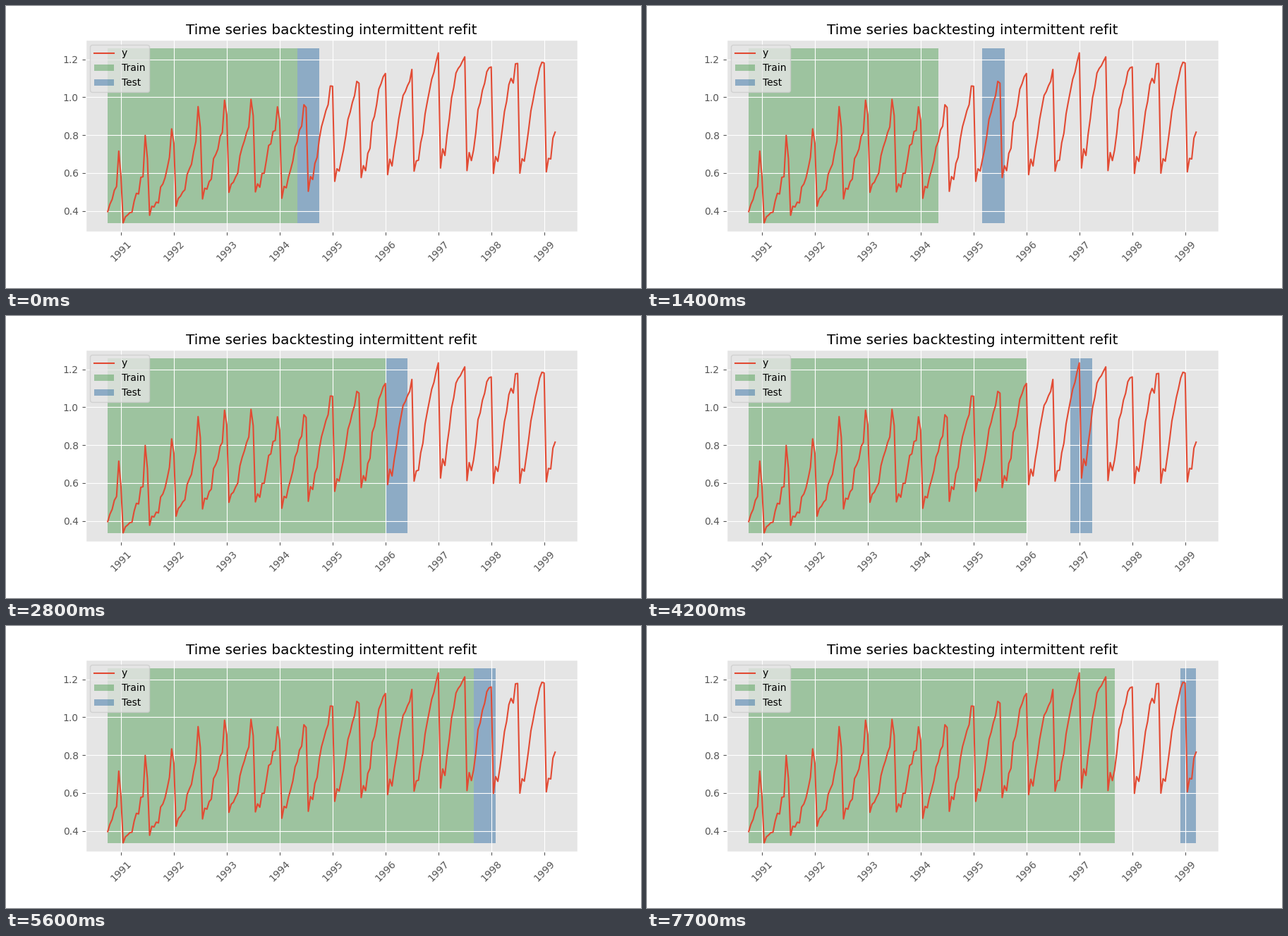
These frames come from a looping animation (900x400 px, 8.4 s). A matplotlib script:

```python
import numpy as np
import matplotlib.pyplot as plt
from matplotlib.animation import FuncAnimation
from matplotlib.patches import Rectangle

plt.rcParams.update({
    "font.family": "DejaVu Sans", "font.size": 10,
    "axes.facecolor": "#E5E5E5", "axes.edgecolor": "white",
    "axes.linewidth": 1, "axes.axisbelow": "line", "axes.grid": True,
    "axes.titlesize": "x-large", "grid.color": "white",
    "xtick.color": "#555555", "ytick.color": "#555555",
})

FIRST_TRAIN, STEP, REFIT, FOLDS = 86, 10, 4, 12
MONTHS, LOW, HIGH = 204, .33622, 1.257
LAST = MONTHS - 1

# Typical January to December values at the start and end of the growth.
EARLY = np.array([.69, .39, .435, .43, .44, .43, .50, .54, .55, .61, .65, .85])
LATE = np.array([1.19, .615, .695, .675, .775, .845,
                 .95, 1.01, 1.085, 1.13, 1.155, 1.18])


def monthly_series():
    """Growing seasonal shape times a slow cycle, with a little noise."""
    t = np.arange(MONTHS)
    season, month = np.divmod(t + 6, 12)
    growth = np.clip((season - 1) / 12, 0, 1)
    shape = EARLY[month] + growth * (LATE - EARLY)[month]
    cycle = np.interp(t / 12, [0, 1, 4, 5, 7, 8, 12, 13, 14, 17],
                      [.8, .9, 1.07, 1.05, .93, 1.02, 1, 1.05, .96, .99])
    noise = np.random.default_rng(4).normal(1, .015, MONTHS)
    return t, np.clip(shape * cycle * noise, LOW, HIGH)


fig, ax = plt.subplots(figsize=(9, 4), dpi=100)
fig.subplots_adjust(left=.125, right=.9, bottom=.2, top=.88)


def add_span(color, label):
    span = Rectangle((0, LOW), 0, HIGH - LOW, facecolor=color, alpha=.4,
                     linewidth=0, label=label)
    return ax.add_patch(span)


line, = ax.plot(*monthly_series(), color="#E24A33", lw=1.5, label="y")
train = add_span("#339138", "Train")
test = add_span("#095595", "Test")

margin = .05 * (HIGH - LOW)
ax.set_xlim(-.05 * LAST, 1.05 * LAST)
ax.set_ylim(LOW - margin, HIGH + margin)
ax.set_xticks(6 + 24 * np.arange(9), range(1991, 2000), rotation=45)
ax.set_yticks([.4, .6, .8, 1.0, 1.2])
ax.set_title("Time series backtesting intermittent refit")
ax.legend(handles=[line, train, test], loc="upper left")


def update(fold):
    start = FIRST_TRAIN + STEP * fold
    train.set_width(FIRST_TRAIN + STEP * (fold - fold % REFIT))
    test.set_x(start)
    test.set_width(min(STEP, LAST - start))
    return train, test


anim = FuncAnimation(fig, update, frames=FOLDS, interval=700,
                     init_func=lambda: update(0), repeat=True, repeat_delay=0)
plt.show()
```
